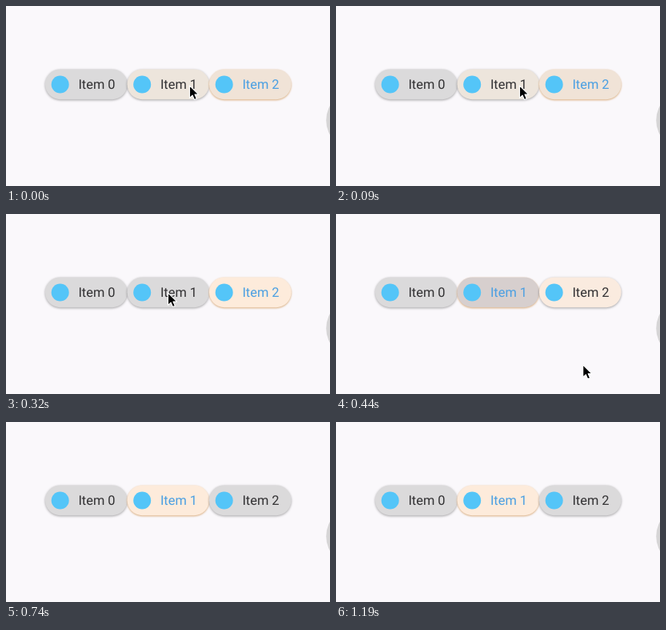
These frames come from a looping animation (405 by 226 pixels, 1490 ms). An HTML page:

```html
<!DOCTYPE html>
<html lang="en">
<head>
<meta charset="utf-8">
<title>Chips</title>
<style>
  html, body { margin: 0; width: 100%; height: 100%; overflow: hidden; background: #faf8fb; }
  svg { display: block; width: 100%; height: 100%; }
  text { font: 16.4px Roboto, sans-serif; text-rendering: geometricPrecision; }
</style>
</head>
<body>
<svg id="stage" viewBox="0 0 405 226">
  <circle cx="438.2" cy="143.5" r="38" fill="#d6d5d6"/>
  <g id="chips"></g>
  <path id="cursor" d="M0 0V15.6L3.6 12.4L6 17.8L8.8 16.6L6.5 11.3H11.2Z"
        fill="#000" stroke="#fff" stroke-width="1.1" stroke-linejoin="round"/>
</svg>
<script>
const LOOP = 1490;
const GREY = '#dbdadb', PEACH = '#fdebdb';

// Start time, selected chip, fills of chips 1 and 2, pointer tip
const steps = [
  { at: 0,   selected: 2, fills: ['#ede5dc', '#f0e3d7'], tip: [229.5, 99.8] },
  { at: 150, selected: 2, fills: [GREY, PEACH],          tip: [202.5, 98.8] },
  { at: 440, selected: 1, fills: ['#d7cfce', '#faebdf'], tip: [308.7, 189.3] },
  { at: 590, selected: 1, fills: [PEACH, GREY],          tip: [350, 218.5] },
  { at: 740, selected: 1, fills: [PEACH, GREY],          tip: null }
];

const group = document.getElementById('chips');
const cursor = document.getElementById('cursor');

function add(name, attrs) {
  const el = document.createElementNS('http://www.w3.org/2000/svg', name);
  for (const key in attrs) el.setAttribute(key, attrs[key]);
  return group.appendChild(el);
}

const chips = [0, 1, 2].map(i => {
  const x = 49 + i * 102.5;
  const body = add('rect', { x, y: 79.4, width: 102.5, height: 37.8, rx: 18.9 });
  add('circle', { cx: x + 18.7, cy: 98.5, r: 11, fill: '#54c5f8' });
  const label = add('text', { x: x + 41.4, y: 104.2 });
  label.textContent = 'Item ' + i;
  return { body, label };
});

function show(step) {
  chips.forEach(({ body, label }, i) => {
    const on = i === step.selected;
    body.setAttribute('fill', i ? step.fills[i - 1] : GREY);
    body.style.filter = on
      ? 'drop-shadow(0.3px 1.6px 1.3px #d09a60d0)'
      : 'drop-shadow(0 1.2px 1.5px #00000058)';
    label.setAttribute('fill', on ? '#4a9fe2' : '#323133');
  });
  cursor.style.display = step.tip ? '' : 'none';
  if (step.tip) cursor.setAttribute('transform', `translate(${step.tip})`);
}

let current;
function tick() {
  const t = performance.now() % LOOP;
  const step = steps.findLast(s => s.at <= t);
  if (step !== current) show(current = step);
  requestAnimationFrame(tick);
}
tick();
</script>
</body>
</html>
```
